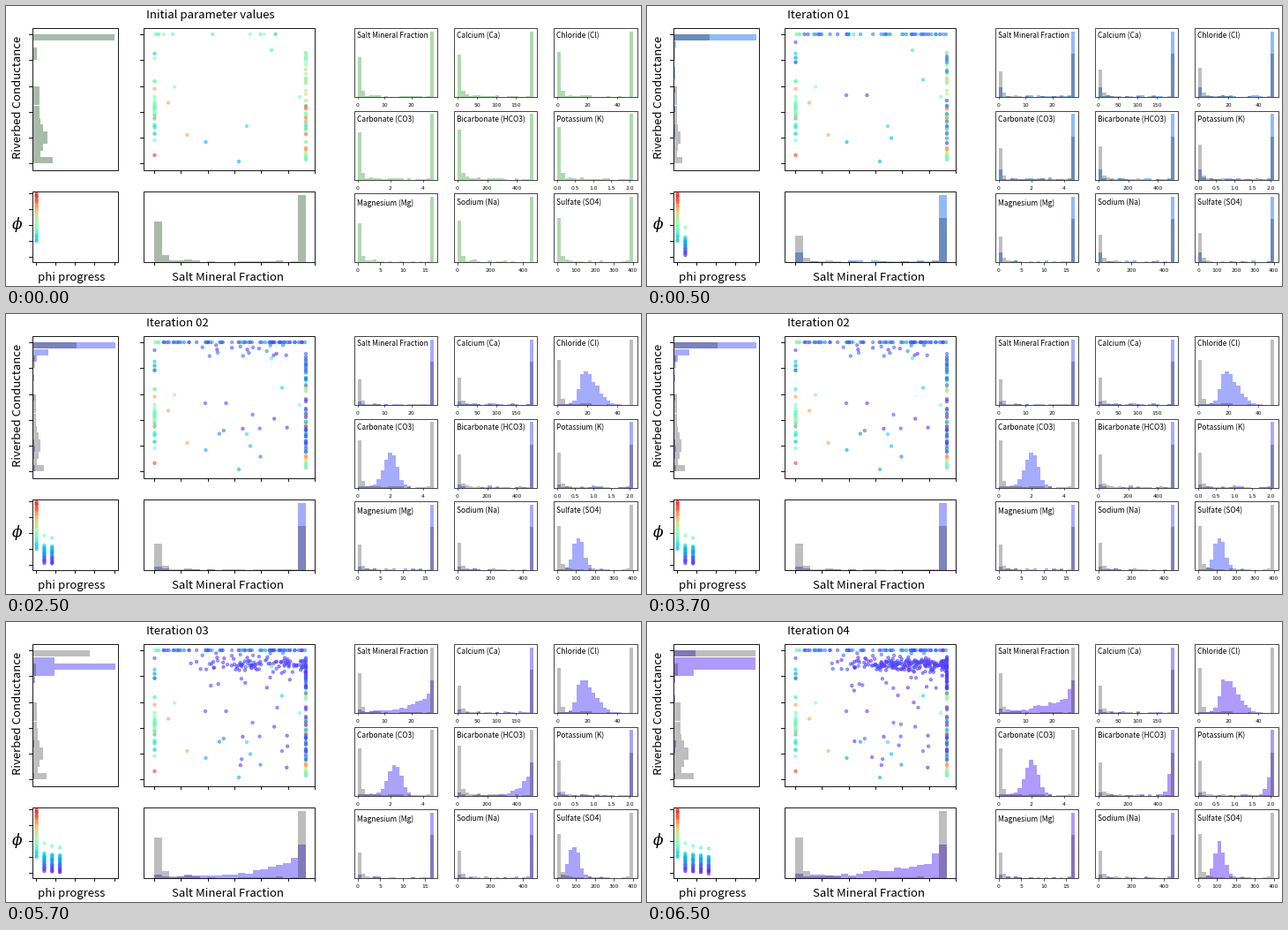
A matplotlib script that plays this animation: 720x317 px, repeating every 8000 ms.

```python
import numpy as np
import matplotlib.pyplot as plt
from matplotlib.animation import FuncAnimation
from matplotlib.colors import to_rgb
from matplotlib.patches import Rectangle

DPI, BINS, STEPS = 100, 20, 5
PX = 72 / DPI  # points per pixel
SANS = "Noto Sans CJK JP"
plt.rcParams["mathtext.fontset"] = "dejavuserif"

GREY = "#bebebe"
START_BIG, START_SMALL = "#a8bbab", "#afd9af"
FILLS = [None, "#8fbbfa", "#a6acfc", "#aba2fa", "#ae9bfa"]
OVERLAP_SHADE = .75

# title, upper end of the data, tick step
PANELS = [
    ("Salt Mineral Fraction", 28.4, 10), ("Calcium (Ca)", 196, 50), ("Chloride (Cl)", 50.8, 20),
    ("Carbonate (CO3)", 4.67, 2), ("Bicarbonate (HCO3)", 514, 200), ("Potassium (K)", 2.11, .5),
    ("Magnesium (Mg)", 16.9, 5), ("Sodium (Na)", 464, 200), ("Sulfate (SO4)", 404, 100),
]
# panel: peak bin, swing between steps, left spread, right spread
BELLS = {2: (6, .3, 1.1, 3.2), 3: (8.9, -.5, 1.9, 1.5), 8: (4.3, .6, 1.2, 1.5)}
# (step, panel): length of the rise toward the last bin
RISES = {(3, 0): 5, (4, 0): 6.5, (3, 4): 2.3, (4, 4): .7, (4, 5): .8}

fig = plt.figure(figsize=(7.2, 3.17), dpi=DPI, facecolor="white")
ax = fig.add_axes([0, 0, 1, 1])
ax.set_xlim(0, 720)
ax.set_ylim(317, 0)
ax.axis("off")
bins = np.arange(BINS)


def label(x, y, text, size, font=SANS, **kw):
    kw = {"ha": "center", "va": "center", **kw}
    return ax.text(x, y, text, fontsize=size * PX, family=font, **kw)


def tick(x, y, dx, dy, width=.9):
    ax.plot([x, x + dx], [y, y + dy], color="black", lw=width * PX, zorder=6)


def box(x0, y0, x1, y1, width=1):
    ax.add_patch(Rectangle((x0, y0), x1 - x0, y1 - y0, fill=False, ec="#1c1c1c",
                           lw=width * PX, zorder=6))


def columns(heights, x, y, span, full, color):
    return list(ax.bar(x + bins * span / BINS, -heights * full, span / BINS, bottom=y,
                       align="edge", color=color, lw=0, zorder=2))


def rows(lengths, x, y, span, full, color):
    return list(ax.barh(y + bins * span / BINS, lengths * full, span / BINS, left=x,
                        align="edge", color=color, lw=0, zorder=2))


def compare(draw, prior, post, step, place, start):
    """Prior and posterior bars, with a darker tone where they overlap."""
    if step == 0:
        return draw(prior, *place, start)
    shade = OVERLAP_SHADE * np.array(to_rgb(FILLS[step]))
    return (draw(prior, *place, GREY) + draw(post, *place, FILLS[step])
            + draw(np.minimum(prior, post), *place, shade))


def speckle(rng, height):
    return height * rng.random(BINS) * (rng.random(BINS) < .65)


def panel_bars(step, panel):
    """Prior and posterior heights, scaled so that the tallest bar is 1."""
    rng = np.random.default_rng(panel + 20)
    prior = .1 * np.exp(-bins / 3) * rng.uniform(.3, 1, BINS) + speckle(rng, .025)
    prior[0], prior[1], prior[-1] = .6 + .04 * (panel % 6), .1, 1

    rng = np.random.default_rng(100 * step + panel)
    post = speckle(rng, .03)
    post[0], post[-1] = (.15 if step == 1 else .05), 1
    if step >= 2 and panel in BELLS:
        peak, swing, left, right = BELLS[panel]
        offset = bins - peak - swing * (-1) ** step
        bell = np.exp(-(offset / np.where(offset < 0, left, right)) ** 2 / 2)
        post = .52 * bell * rng.uniform(.88, 1.08, BINS) + .015 * (bins < 14)
    elif (step, panel) in RISES:
        length = RISES[step, panel]
        post += .36 * np.exp((bins - 18) / length) * rng.uniform(.65, 1.1, BINS)
        post[-1] = 1 if length < 1 else .5
    crowded = step > 0 and post[-1] == 1
    return prior * (.66 if crowded else 1), post


def bed_bars(step):
    prior = .07 * (bins > 7) + .11 * np.exp(-((bins - 15.5) / 1.6) ** 2)
    prior += .04 * (abs(bins - 2.5) < 1) + .01
    prior[0], prior[-1] = 1, .25
    if step:
        prior /= 1 + .43 * (STEPS - 1 - step)
    if step < 3:
        post = np.exp(-bins * (5.8 - 2 * step))
    else:
        post = np.exp(-((bins - 3.5 + .5 * step) / (.36 * step - .24)) ** 2)
    post /= post.max()
    return prior, post + speckle(np.random.default_rng(step + 5), .025)


def dots(x, y, value):
    colors = plt.cm.rainbow(np.clip(value, 0, 1))
    return ax.scatter(x, y, s=(3.4 * PX) ** 2, c=colors, alpha=.55, lw=.9 * PX, zorder=4)


def samples(step):
    """Scatter points added by one step: x, y and misfit."""
    rng = np.random.default_rng(step + 40)
    west, east, north, south = 168.5, 340, 32, 178

    def spread(n, x, y, value):
        return np.c_[rng.uniform(*x, n), rng.uniform(*y, n), rng.uniform(*value, n)]

    def west_edge(n, y, value):
        return spread(n, (west, west), y, value)

    def east_edge(n, y, value):
        return spread(n, (east, east), y, value)

    def north_edge(n, x, value):
        return spread(n, x, (north, north), value)

    if step == 0:
        mild, poor = (.28, .6), (.75, .98)
        inner = [(301, 50, .37), (191, 91.5, .5), (184, 109.5, .78), (205.5, 146, .78),
                 (226.5, 154, .24), (273, 136, .33), (264, 176, .24), (333, 103, .47)]
        parts = [inner, west_edge(22, (90, south), mild), west_edge(3, (55, south), poor),
                 west_edge(4, (38, 88), mild), east_edge(40, (44, south), (.3, .7)),
                 east_edge(7, (100, south), poor), north_edge(6, (west, 192), mild),
                 north_edge(5, (225, east), mild)]
    elif step == 1:
        inner = [(226, 101, .1), (249.5, 101, .08), (313, 83.5, .32), (277, 149.5, .27)]
        good = (.07, .25)
        parts = [inner, north_edge(38, (west, east), good), east_edge(13, (33, 175), good),
                 west_edge(4, (38, 120), good)]
    elif step == 2:
        good = (.05, .2)
        parts = [north_edge(26, (west, east), good), spread(18, (220, east), (34, 48), good),
                 spread(8, (240, 322), (95, 166), good), east_edge(24, (33, 160), good)]
    else:
        good = (.05, .13)
        n = 95 if step == 3 else 110
        x = 205 + 135 * rng.beta(2, 1.05, n)
        cluster = np.c_[x, rng.normal(48.5, 3.8, n), rng.uniform(*good, n)]
        parts = [cluster, spread(7, (220, east), (58, 80), good),
                 spread(6, (235, 335), (80, 165), good), east_edge(12, (38, 78), good)]
    return np.concatenate(parts).T


def misfit_column(step):
    rng = np.random.default_rng(step + 70)
    if step == 0:
        y = np.linspace(213, 266, 34)
    else:
        y = np.r_[np.linspace(261 + step, 280.5 + step, 18), 249 + 2 * step]
    y = y + rng.uniform(-.8, .8, len(y))
    return dots(np.full(len(y), 34.6 + 8.83 * step), y, (286 - y) / 73)


def panel_origin(panel):
    return 394.5 + 113.1 * (panel % 3), 103 + 93.6 * (panel // 3)


def draw_frame():
    for x0, x1 in ((29.5, 126.5), (155.5, 349.5)):
        box(x0, 24.5, x1, 185.5)
        box(x0, 209.5, x1, 289.5)
        for i in range(6):
            tick(x0, 32.2 + 29.2 * i, -3.5, 0)
    for i in range(7):
        for y in (185.5, 289.5):
            tick(168 + 30.3 * i, y, 0, 3.5)
    for i in range(5):
        tick(34.2 + 22.08 * i, 289.5, 0, 3.5)
        tick(29.5, 211.5 + 18 * i, -3.5, 0)
    label(13.6, 103.8, "Riverbed Conductance", 13.2, rotation=90)
    label(74.5, 307.3, "phi progress", 13.2)
    label(251.7, 307.3, "Salt Mineral Fraction", 13.2)
    label(13, 248, r"$\phi$", 17)
    for panel, (title, top, gap) in enumerate(PANELS):
        x, y = panel_origin(panel)
        box(x, y - 78, x + 94.8, y, .8)
        label(x + 3.8, 36 + 94.8 * (panel // 3), title, 8.4, ha="left", va="baseline", zorder=7)
        for value in np.arange(0, top, gap):
            at = x + 4.3 + 86.4 * value / top
            tick(at, y, 0, 2.4, .6)
            label(at, y + 9.5, f"{value:.1f}" if gap < 1 else f"{value:.0f}", 6, "DejaVu Sans")


def draw_step(step):
    caption = f"Iteration {step:02d}" if step else "Initial parameter values"
    artists = [label(159, 10.6, caption, 13.2, ha="left")]
    artists += compare(rows, *bed_bars(step), step, (30.3, 32.2, 146, 92.5), START_BIG)
    for panel in range(len(PANELS)):
        bars = panel_bars(step, panel)
        x, y = panel_origin(panel)
        artists += compare(columns, *bars, step, (x + 4.3, y, 86.4, 74.3), START_SMALL)
        if panel == 0:
            artists += compare(columns, *bars, step, (168, 290, 172, 76.3), START_BIG)
    return artists


draw_frame()
scenes = [draw_step(step) for step in range(STEPS)]
clouds = [(dots(*samples(step)), misfit_column(step)) for step in range(STEPS)]


def update(frame):
    step = (frame + 3) // 4  # a short opening, then four frames per iteration
    for i, (scene, cloud) in enumerate(zip(scenes, clouds)):
        for artist in scene:
            artist.set_visible(i == step)
        for artist in cloud:
            artist.set_visible(i <= step)
    return []


anim = FuncAnimation(fig, update, frames=16, interval=500, repeat=True, blit=False)
plt.show()
```
